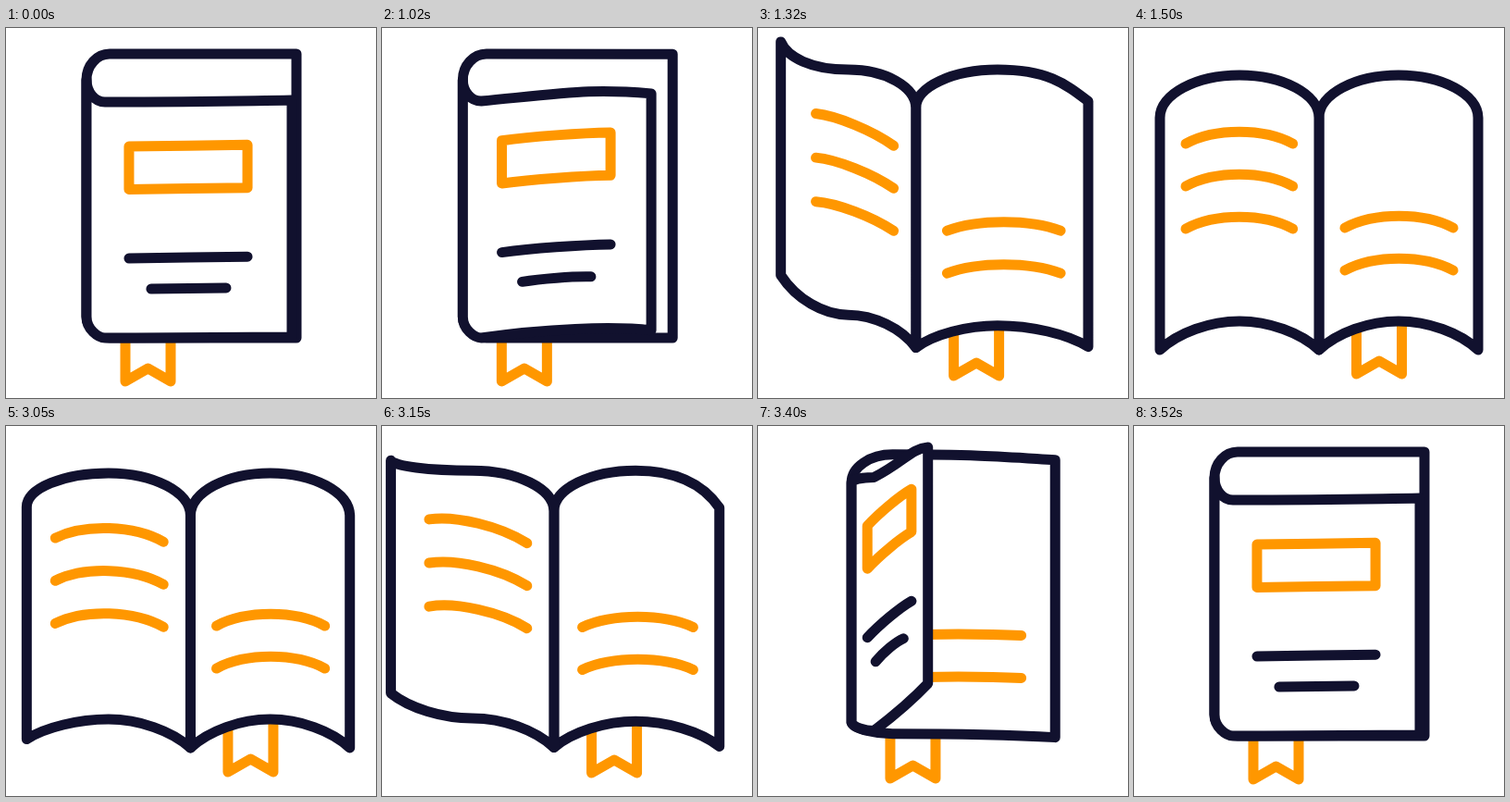
An HTML page with a canvas that plays this animation: 400x400 px, repeating every 3.55 s.

```html
<!DOCTYPE html>
<html lang="en">
<head>
<meta charset="utf-8">
<title>Book</title>
<style>
  html, body { margin: 0; width: 100%; height: 100%; overflow: hidden; background: #fff; }
  canvas { display: block; }
</style>
</head>
<body>
<canvas id="stage" width="400" height="400"></canvas>
<script>
const ctx = document.getElementById('stage').getContext('2d');
const NAVY = '#11112e', ORANGE = '#ff9700';
const LOOP = 3550, OPEN_AT = 1020, OPENED_AT = 1500, CLOSE_AT = 3050;

const lerp = (a, b, k) => a + (b - a) * k;
const smooth = k => k * k * (3 - 2 * k);

function stroke(path, color) {
  ctx.strokeStyle = color;
  ctx.stroke(path);
}

// A leaf is two curves from the spine over a middle point to the outer edge.
// corner: roundness at the edge, pinch: sharpness at the spine, bulge: upward bend.
function drawLeaf({ spine, mid, edge, corner, pinch, bulge }) {
  const across = k => lerp(mid.x, edge.x, k);
  const path = new Path2D(`
    M${spine.x} ${spine.top}
    C${spine.x} ${lerp(spine.top, mid.top, .55)} ${lerp(mid.x, spine.x, .55)} ${mid.top} ${mid.x} ${mid.top}
    C${across(.55)} ${mid.top - bulge} ${across(corner)} ${lerp(mid.top, edge.top, .45) - bulge} ${edge.x} ${edge.top}
    V${edge.bottom}
    C${across(.77)} ${lerp(edge.bottom, mid.bottom, .6) - bulge} ${across(.37)} ${mid.bottom - bulge} ${mid.x} ${mid.bottom}
    C${lerp(mid.x, spine.x, .37)} ${mid.bottom} ${lerp(spine.x, mid.x, pinch)} ${lerp(spine.bottom, mid.bottom, .6)} ${spine.x} ${spine.bottom}
    Z`);
  ctx.fill(path);
  stroke(path, NAVY);
}

// A line of print, bent upward by its bulge.
const band = (x0, y0, x1, y1, bulge) =>
  `${x0} ${y0}C${lerp(x0, x1, .27)} ${lerp(y0, y1, .27) - bulge} ` +
  `${lerp(x0, x1, .73)} ${lerp(y0, y1, .73) - bulge} ${x1} ${y1}`;

const drawBand = (line, color) => stroke(new Path2D('M' + line), color);

function drawBookmark(p) {
  const x = lerp(153.5, 265, p), y = lerp(382, 374, p), top = lerp(336, 322, p);
  stroke(new Path2D(`M${x - 24.5} ${top}V${y}L${x} ${y - 14}L${x + 24.5} ${y}V${top}`), ORANGE);
}

function drawRightLines(p) {
  for (const dy of [0, 46]) {
    const y = lerp(228, 216, p) + dy;
    drawBand(band(lerp(137, 228, p), y, lerp(276, 345, p), y, 17 * p), ORANGE);
  }
}

function drawFront(spineX, width, lift, bulge) {
  const x = s => spineX + width * s;
  const rise = s => (3 + lift) * s + bulge * (.4 + .5 * s);
  const row = (from, to, y) => band(x(from), y - rise(from), x(to), y - rise(to), bulge * .2);
  stroke(new Path2D(`M${row(.207, .784, 128.7)}L${row(.784, .207, 175)}Z`), ORANGE);
  drawBand(row(.207, .784, 249.6), NAVY);
  drawBand(row(.315, .68, 283), NAVY);
}

function drawInnerLines(spineX, width, lift, p) {
  const near = spineX + width * .165;
  const far = spineX + width * (.837 - lift / 800);
  for (let i = 0; i < 3; i++) {
    const y = 125 + 46 * i;
    drawBand(band(far, y - lift * (.42 - .02 * i), near, y + lift * .03, 17 * p ** 3), ORANGE);
  }
}

// Moves in 20 steps each way: 0 is closed, 1 is open.
function progress(t) {
  if (t < OPEN_AT) return 0;
  if (t < OPENED_AT) return (Math.floor((t - OPEN_AT) / 25) + .8) / 20;
  if (t < CLOSE_AT) return 1;
  return Math.max(0, 1 - (Math.floor((t - CLOSE_AT) / 24.7) + 1) / 20);
}

function render(t) {
  const u = progress(t);
  const p = u < .5 ? 2 * u * u : 1 - 2 * (1 - u) ** 2;
  const early = 1 - (1 - p) ** 2;

  ctx.fillStyle = '#fff';
  ctx.fillRect(0, 0, 400, 400);
  ctx.lineWidth = 11;
  ctx.lineCap = ctx.lineJoin = 'round';

  drawBookmark(p);

  const spine = { x: lerp(87, 200, p), top: lerp(56, 97, p), bottom: lerp(312, 348, early) };
  const edge = { x: lerp(314, 372, p), top: lerp(28, 97, p), bottom: lerp(335, 348, p) };
  const mid = {
    x: lerp(spine.x, edge.x, lerp(.11, .5, early)),
    top: lerp(28, 51, p),
    bottom: lerp(335, 317, p)
  };
  const pinch = .23 * early;
  drawLeaf({ spine, mid, edge, corner: lerp(.7, 1, p ** 6), pinch, bulge: 0 });
  drawRightLines(p);

  // The cover swings over the spine; its edge rises towards the viewer halfway.
  const swing = 1 - 2 * (u + 2.65 * u ** 2.5 * (1 - u) ** 1.2);
  const width = lerp(222, 172, p) * swing;
  const height = Math.max(0, Math.sin(Math.PI * u));
  const lift = 87 * height ** 1.2;
  const turned = smooth(Math.min(1, 2 * u));
  const bulge = 1.5 * lift * Math.max(0, swing) * (1 - turned);
  drawLeaf({
    spine,
    mid: {
      x: spine.x + width * lerp(.09, .5, turned),
      top: lerp(80, mid.top, turned),
      bottom: mid.bottom - 19 * height ** 5
    },
    edge: {
      x: spine.x + width,
      top: lerp(78, 97, p) - lift,
      bottom: lerp(334, 348, p) - lift
    },
    corner: lerp(.65, 1, p), pinch, bulge
  });
  if (width > 0) drawFront(spine.x, width, lift, bulge);
  else drawInnerLines(spine.x, width, lift, p);
}

const start = performance.now();
function frame() {
  render((performance.now() - start) % LOOP);
  requestAnimationFrame(frame);
}
frame();
</script>
</body>
</html>
```
